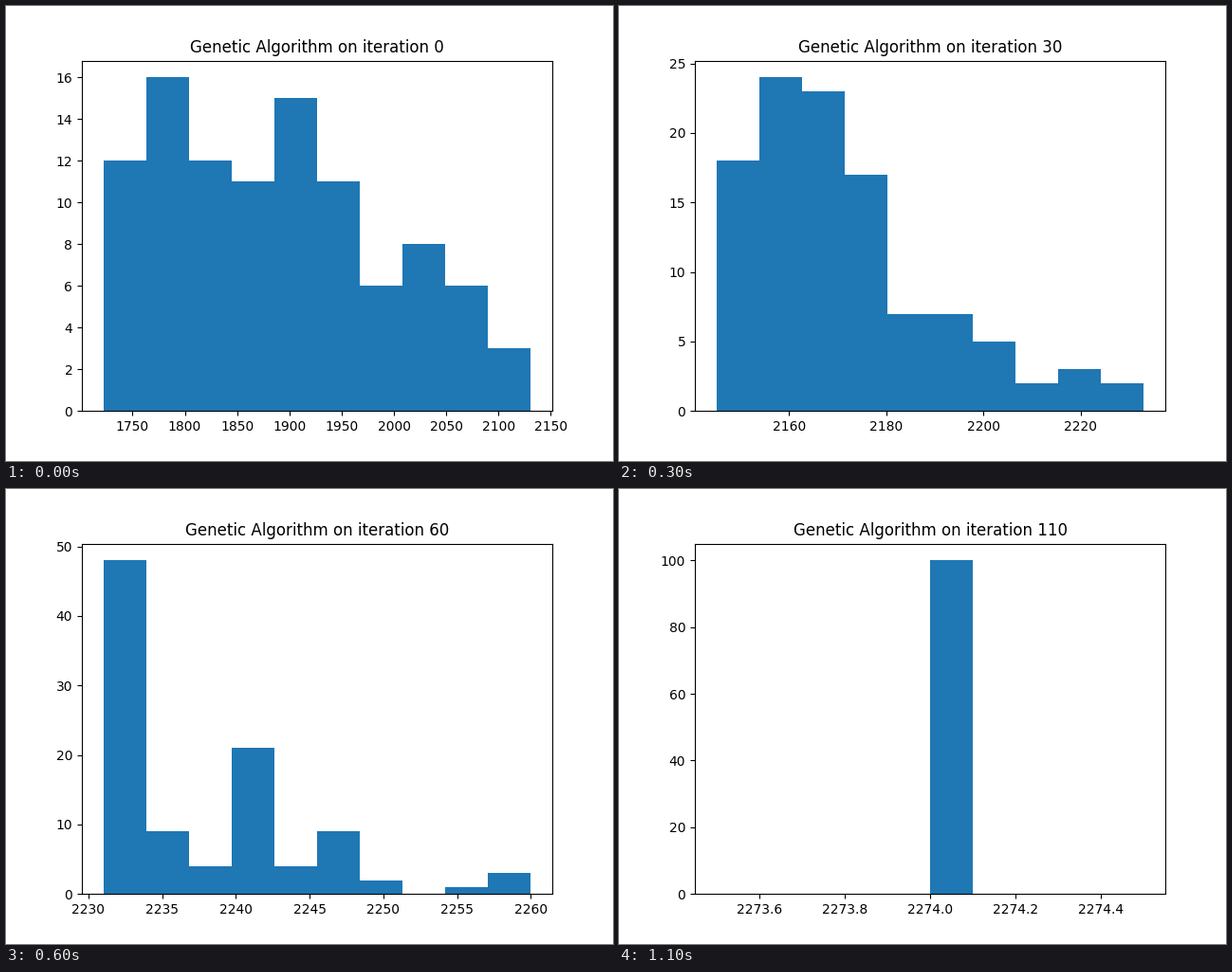
A matplotlib script for the animation above (2110 ms loop, 640 by 480 pixels).

```python
import matplotlib.pyplot as plt
import numpy as np
from matplotlib.animation import FuncAnimation

TICK = 10        # ms per frame
HOLD = 100       # ms per histogram
LOOP = 2110      # ms, the last histogram stays for the rest
LAST = 110       # final iteration
BINS = np.arange(10)

# key iterations, with the weakest and fittest individual at each
KEYS = [0, 10, 30, 50, 60, 80, 100]
WORST = [1722, 2030, 2145, 2207, 2231, 2259, 2274]
BEST = [2131, 2142, 2233, 2260, 2260, 2274, 2274]


def hills(ratio, peaks):
    """Bell curves around {bin: height}; ratio is the drop to the next bin."""
    curves = [h * ratio ** ((BINS - b) ** 2.0) for b, h in peaks.items()]
    return np.max(curves, axis=0)


SHAPES = np.array([
    hills(0.75, {1: 16, 4: 15, 7: 8}),
    hills(0.42, {0: 27, 2: 16, 4: 12, 6: 7, 8: 4}),
    hills(0.75, {1: 24, 2: 23, 5: 7, 8: 3}),
    hills(0.39, {1: 44, 4: 7, 6: 5, 8: 2}),
    hills(0.19, {0: 48, 3: 21, 5: 9, 9: 3}),
    hills(0.01, {0: 34, 3: 6, 6: 35, 7: 21, 9: 3}),
    hills(0.00, {5: 100}),
])


def population(iteration):
    low, high = (round(np.interp(iteration, KEYS, v)) for v in (WORST, BEST))
    if low == high:
        low, high = low - 0.5, high + 0.5
    counts = [np.interp(iteration, KEYS, column) for column in SHAPES.T]
    return low, high, np.round(counts)


fig, ax = plt.subplots(figsize=(6.4, 4.8), dpi=100)
bars = ax.bar(BINS, 1, width=1, align="edge", color="#1f77b4")


def update(frame):
    iteration = min(frame * TICK // HOLD * 10, LAST)
    low, high, counts = population(iteration)
    width = (high - low) / len(BINS)
    for i, bar in enumerate(bars):
        bar.set_bounds(low + i * width, 0, width, counts[i])
    margin = 0.05 * (high - low)
    ax.set_xlim(low - margin, high + margin)
    ax.set_ylim(0, 1.05 * max(counts))
    ax.set_title(f"Genetic Algorithm on iteration {iteration}")
    return list(bars)


anim = FuncAnimation(fig, update, frames=LOOP // TICK, interval=TICK,
                     init_func=lambda: update(0), repeat=True, repeat_delay=0)
plt.show()
```
